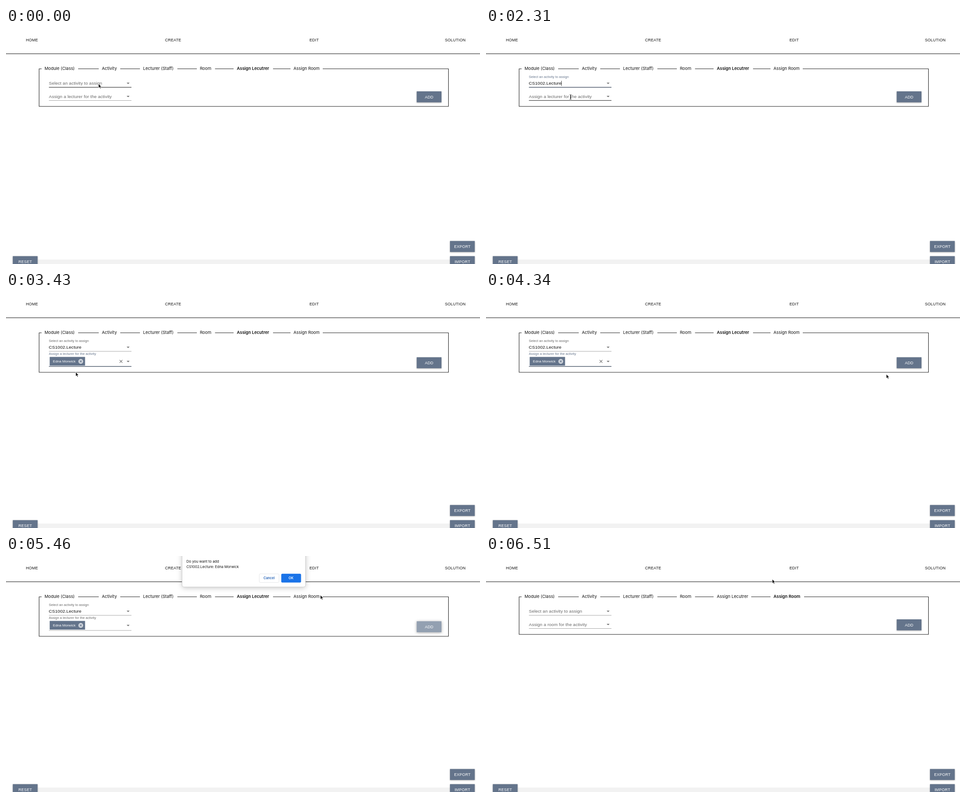
Write an HTML page that moves like this. It is 1058 by 529 pixels and loops after 6.93 s.

```html
<!DOCTYPE html>
<html lang="en">
<head>
<meta charset="utf-8">
<title>Assign lecturer</title>
<style>
  html, body { margin: 0; width: 100%; height: 100%; overflow: hidden; background: #fff; }
  svg { display: block; width: 1058px; height: 529px; }
  text { white-space: pre; }
  .field { font: 9.9px "Liberation Sans", Arial, sans-serif; letter-spacing: .0094em; }
  .caps { font: 8.66px "Liberation Sans", Arial, sans-serif; letter-spacing: .0286em; }
  .tab { font: 9.45px Inter, sans-serif; }
  .tab.current { font-weight: 600; }
  .chip { font: 8.04px "Liberation Sans", Arial, sans-serif; }
  .dialog { font: 7.9px Inter, sans-serif; }
  .action { font: 600 7.4px Inter, sans-serif; }
  .raised { filter: drop-shadow(0 1px 1.5px rgba(0,0,0,.32)); }
  .raised.lifted { filter: drop-shadow(0 1.5px 3.4px rgba(0,0,0,.34)); }
  .paper { filter: drop-shadow(0 1.2px 1.8px rgba(0,0,0,.3)); }
  .modal { filter: drop-shadow(0 2px 6px rgba(0,0,0,.22)); }
</style>
</head>
<body>
<svg id="stage" viewBox="0 0 1058 529"></svg>
<script>
const LOOP = 6930, STEP = 70;
const SLATE = '#64748b', INK = '#111';
const PERSON = 'Edna Morwick';
const OPEN1 = 1400, PICK1 = 2240, OPEN2 = 2800, PICK2 = 3360, BLUR = 4840, DONE = 6020;
const stage = document.getElementById('stage');

const clamp = u => Math.max(0, Math.min(1, u));
const ramp = (t, start, length) => clamp((t - start) / length);
const out = u => 1 - Math.pow(1 - u, 3.2);
const smooth = u => u * u * (3 - 2 * u);
const between = (t, a, b) => t >= a && t < b;
const mix = (a, b, p) => `rgb(${a.map((v, i) => Math.round(v + (b[i] - v) * p))})`;

function set(node, attrs) {
  for (const key in attrs) node.setAttribute(key, attrs[key]);
  return node;
}
function add(parent, tag, attrs = {}, content = '') {
  const node = document.createElementNS('http://www.w3.org/2000/svg', tag);
  node.textContent = content;
  return parent.appendChild(set(node, attrs));
}
const group = (parent, attrs) => add(parent, 'g', attrs);
const rect = (parent, x, y, width, height, fill, more) =>
  add(parent, 'rect', { x, y, width, height, fill, ...more });
const label = (parent, cls, x, y, content, fill = INK, more) =>
  add(parent, 'text', { class: cls, x, y, fill, ...more }, content);
const show = (node, visible) => set(node, { display: visible ? 'inline' : 'none' });

function button(x, y, caption) {
  const g = group(stage);
  const face = rect(g, x, y, 55.3, 24.6, SLATE, { class: 'raised' });
  label(g, 'caps', x + 27.7, y + 15.5, caption, '#fff', { 'text-anchor': 'middle' });
  return { g, face };
}

// Page header and footer
rect(stage, 0, 57.2, 1058, 1.1, '#222');
[[44.5, 'HOME'], [355, 'CREATE'], [677.5, 'EDIT'], [979.7, 'SOLUTION']]
  .forEach(([x, name]) => label(stage, 'caps', x, 30.2, name));
rect(stage, 71, 519, 920, 10, '#f2f2f2');
button(15.2, 511.4, 'RESET');
button(991, 511.4, 'IMPORT');
button(991, 477.4, 'EXPORT');

// Framed form with tabs
const frame = add(stage, 'path', { fill: 'none', stroke: '#222', 'stroke-width': 1.1 });
const tabs = [[86, 'Module (Class)'], [214, 'Activity'], [306, 'Lecturer (Staff)'],
  [432.7, 'Room'], [515.2, 'Assign Lecutrer'], [641.7, 'Assign Room']]
  .map(([x, name]) => label(stage, 'tab', x, 94.4, name));
const addButton = button(916.7, 142, 'ADD');

function makeField(bottom, parent) {
  const g = group(parent);
  const name = label(g, 'field', 0, 0, '');
  const line = group(g);
  rect(line, 95.8, bottom - .8, 184.2, .8, '#8f8f8f');
  const hover = rect(line, 95.8, bottom - 1.2, 184.2, 1.3, '#1c1c1c');
  const focus = rect(line, 0, bottom - 1.2, 0, 1.3, '#4f5c70');
  const arrow = add(g, 'path', { d: 'M-3.3 -1.6H3.3L0 1.7Z', fill: '#757575' });
  const base = bottom - 6;
  return s => {
    const p = s.raised, w = 184.2 * s.focus, dy = s.drop || 0;
    name.textContent = s.name;
    set(name, {
      transform: `translate(95.7 ${base - 15.7 * p}) scale(${1 - .25 * p})`,
      fill: mix([102, 102, 102], [100, 116, 139], s.focus)
    });
    set(line, { transform: `translate(0 ${dy})` });
    set(hover, { opacity: s.hover });
    set(focus, { x: 187.9 - w / 2, width: w });
    set(arrow, { transform: `translate(272.6 ${bottom - 9.4 + dy / 2}) scale(1 ${s.open ? -1 : 1})` });
  };
}
const drawActivity = makeField(133.4, stage);
const drawLecturer = makeField(163, stage);

const activity = label(stage, 'field', 95.6, 127.4, 'CS1002.Lecture');
const caret = rect(stage, 0, 0, .8, 11.2, INK);

// Selected lecturer
const chip = group(stage);
rect(chip, 97.5, 145.6, 79, 19.5, SLATE, { rx: .6 });
label(chip, 'chip', 104.8, 158.4, PERSON, '#fff');
add(chip, 'circle', { cx: 166.9, cy: 155.5, r: 5.4, fill: '#d0d5dc' });
add(chip, 'path', { d: 'M164.7 153.3l4.4 4.4m0 -4.4l-4.4 4.4', stroke: SLATE, 'stroke-width': 1.1 });
const clear = add(stage, 'path',
  { d: 'M253.6 152.4l6.2 6.2m0 -6.2l-6.2 6.2', stroke: '#666', 'stroke-width': 1.1 });

function makeMenu(y, options) {
  const g = group(stage);
  rect(g, 95.8, y, 184.4, 9.9 + 22.1 * options.length, '#fff', { rx: 2.4, class: 'paper' });
  const mark = rect(g, 95.8, y + 5, 184.4, 22.1, '#f3f3f3');
  options.forEach((name, i) => label(g, 'field', 105.6, y + 19.6 + 22.1 * i, name));
  return { g, mark };
}
const activityMenu = makeMenu(133.4, ['CS1002.Lecture', 'CS1002.Exercise']);
const lecturerMenu = makeMenu(163.1, [PERSON]);

// Confirmation dialog
const dialog = group(stage);
const sheet = add(dialog, 'path', { stroke: '#bdbdbd', 'stroke-width': .7, class: 'modal' });
const message = group(dialog);
label(message, 'dialog', 402.8, 14.9, 'Do you want to add');
label(message, 'dialog', 402.8, 27, 'CS1002.Lecture: ' + PERSON);
const middle = { 'text-anchor': 'middle' };
rect(message, 565.3, 40, 44, 19.4, 'none', { rx: 2.4, stroke: '#dadce0', 'stroke-width': .7 });
label(message, 'action', 587.2, 52.3, 'Cancel', '#2a66b8', middle);
rect(message, 614.4, 39.8, 44.2, 19.8, '#1a73e8', { rx: 2.4 });
label(message, 'action', 636.3, 52.3, 'OK', '#fff', middle);

// Pointer
const pointer = group(stage);
const arrowTip = add(pointer, 'path', {
  d: 'M0 0V9.4L2.2 7.4L3.7 10.9L5.3 10.2L3.8 6.8H6.7Z',
  fill: '#000', stroke: '#fff', 'stroke-width': .8
});
const beam = add(pointer, 'path', {
  d: 'M-2 -5.3Q0 -5.3 0 -4V4Q0 5.3 -2 5.3M2 -5.3Q0 -5.3 0 -4V4Q0 5.3 2 5.3M-1.2 1.4H1.2',
  fill: 'none', stroke: '#111', 'stroke-width': .9
});
// time, x, y, text cursor
const moves = [
  [0, 206.5, 125, 0], [279, 206.5, 125, 0], [280, 206.5, 127, 1], [910, 206.5, 127, 1],
  [980, 206.5, 124, 1], [1540, 206.5, 124, 1], [1610, 203, 132, 0], [1820, 187.5, 150, 0],
  [2239, 187.5, 150, 0], [2240, 188.7, 154.7, 1], [2940, 188.7, 154.7, 1],
  [2950, 186, 157, 0], [3150, 155.5, 179.6, 0], [3500, 155.5, 179.6, 0],
  [3850, 777, 225, 0], [3990, 777, 225, 0], [4550, 947.5, 165.5, 0],
  [5040, 947.5, 165.5, 0], [5460, 701.7, 87.5, 0], [5530, 701.7, 87.5, 0],
  [5880, 639, 52, 0], [LOOP, 639, 52, 0]
];

function drawPointer(t) {
  let i = 0;
  while (i < moves.length - 2 && t >= moves[i + 1][0]) i++;
  const [t0, x0, y0, text] = moves[i], [t1, x1, y1] = moves[i + 1];
  const p = smooth(ramp(t, t0, t1 - t0));
  set(pointer, { transform: `translate(${x0 + (x1 - x0) * p} ${y0 + (y1 - y0) * p})` });
  show(arrowTip, !text);
  show(beam, text);
}

function drawForm(t) {
  const done = t >= DONE, picked = between(t, PICK2, DONE), drop = picked ? 4.3 : 0;
  const rise1 = done ? 0 : out(ramp(t, OPEN1 - 40, 200));
  const rise2 = done ? 0 : out(ramp(t, OPEN2 - 40, 200));
  const fall2 = out(ramp(t, BLUR, 200));

  tabs.forEach((tab, i) => tab.classList.toggle('current', i === (done ? 5 : 4)));
  set(frame, {
    d: `M79.5 91.5H73.9V${175.7 + drop}H987.6V91.5H${done ? 710 : 707}` +
      `M161 91.5H207M255 91.5H299M382.5 91.5H426M466.5 91.5H508M${done ? 592 : 596} 91.5H635`
  });

  drawActivity({
    name: 'Select an activity to assign', raised: rise1,
    focus: done ? 0 : rise1 - rise2, open: between(t, OPEN1, PICK1),
    hover: t < 980 ? (.65 + .35 * ramp(t, 0, 140)) * (1 - ramp(t, 210, 210))
      : ramp(t, 910, 210) * (1 - ramp(t, 1610, 200))
  });
  drawLecturer({
    name: done ? 'Assign a room for the activity' : 'Assign a lecturer for the activity',
    raised: rise2, focus: done ? 0 : rise2 - fall2, open: between(t, OPEN2, PICK2), drop,
    hover: ramp(t, 2170, 200) * (1 - ramp(t, 2950, 200))
  });

  show(activity, between(t, PICK1, DONE));
  show(chip, picked);
  show(clear, between(t, PICK2, BLUR - 10));
  show(activityMenu.g, between(t, OPEN1, PICK1));
  show(activityMenu.mark, t >= 1750);
  show(lecturerMenu.g, between(t, OPEN2, PICK2));
  show(lecturerMenu.mark, t >= 3080);

  const typed = between(t, PICK1, 2590), opened = between(t, OPEN1, 1960);
  const second = between(t, OPEN2, 3150), after = between(t, 3570, 4060) || between(t, 4550, 4830);
  show(caret, typed || opened || second || after);
  set(caret, { x: typed ? 168.2 : after ? 178.6 : 95.8, y: after ? 150 : second ? 148 : 118.4 });

  const pale = ramp(t, 5040, 350) * (1 - ramp(t, DONE, 210));
  set(addButton.g, { transform: `translate(0 ${drop})` });
  set(addButton.face, { fill: mix([100, 116, 139], [147, 160, 177], pale) });
  addButton.face.classList.toggle('lifted', between(t, 4480, 6160));
}

// The sheet tips back, narrower at the top, while it fades
function drawDialog(t) {
  const p = ramp(t, 4830, 160) * (1 - ramp(t, 5880, 140)), q = 1 - p;
  const low = 8 * q, high = 14 * q, bottom = 69.4 - 11 * q, sx = 1 - .048 * q;
  show(dialog, p > 0);
  set(dialog, { opacity: p, transform: `translate(0 ${-15.5 * q})` });
  set(sheet, {
    fill: mix([150, 150, 150], [255, 255, 255], p),
    d: `M${393 + high} -20L${393 + low} ${bottom - 5}q0 5 5 5H${663.6 - low}q5 0 5 -5L${668.6 - high} -20Z`
  });
  set(message, { transform: `translate(${565 * (1 - sx)} 0) scale(${sx} 1)` });
}

function tick() {
  const t = Math.floor(performance.now() % LOOP / STEP) * STEP;
  drawForm(t);
  drawDialog(t);
  drawPointer(t);
  requestAnimationFrame(tick);
}
tick();
</script>
</body>
</html>
```
